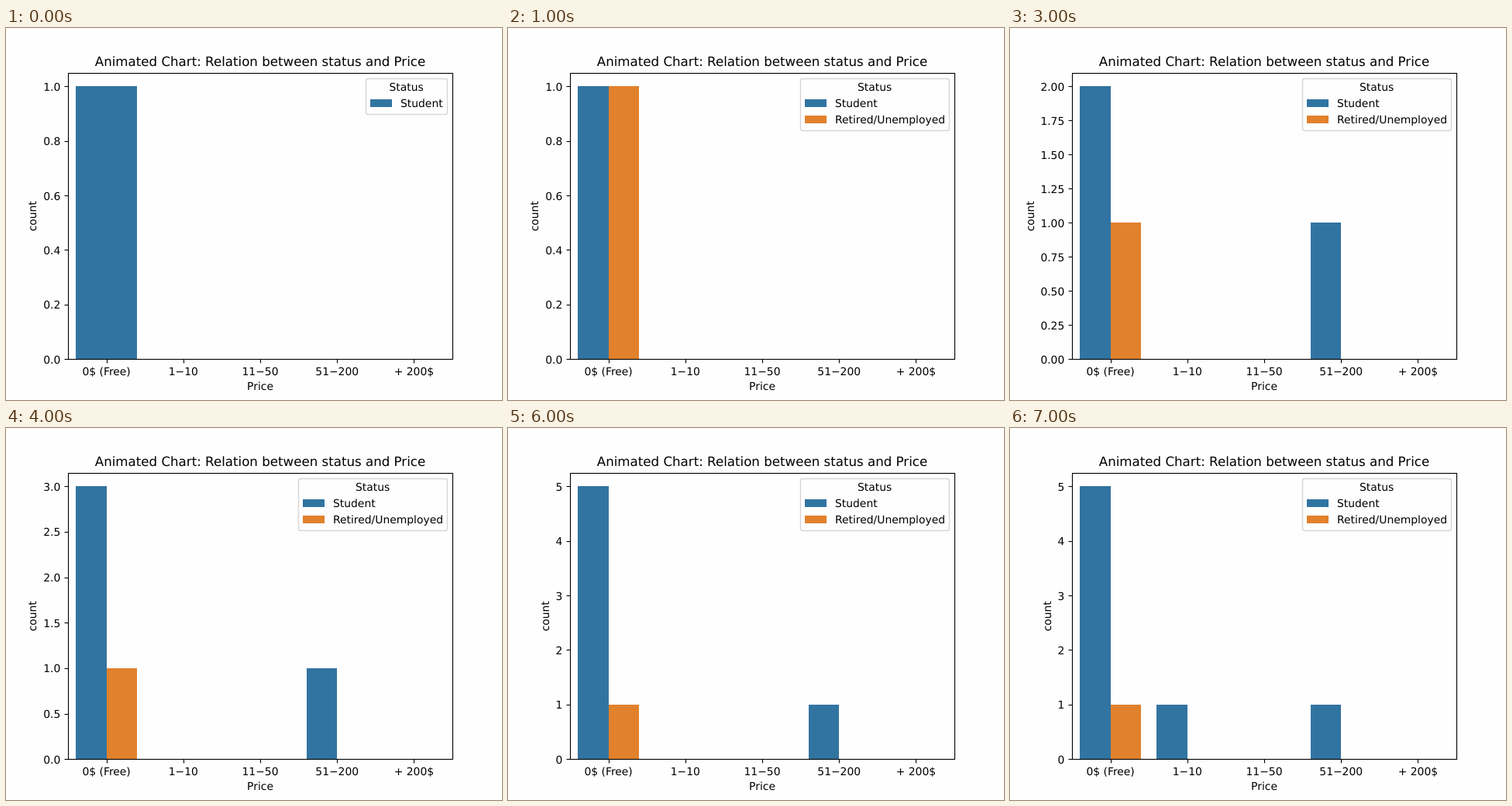
These frames come from a looping animation (640x480 px, 8000 ms). An HTML page with a canvas:

```html
<!DOCTYPE html>
<html lang="en">
<head>
<meta charset="utf-8">
<title>Animated bar chart</title>
<style>
  html, body { margin: 0; width: 100%; height: 100%; overflow: hidden; background: #fefefe; }
  canvas { display: block; }
</style>
</head>
<body>
<canvas id="chart" width="640" height="480"></canvas>
<script>
const ctx = document.getElementById('chart').getContext('2d');

const AXES = { left: 80, right: 576, top: 57.6, bottom: 427.2 };
const BAND = (AXES.right - AXES.left) / 5;
const PLOT_HEIGHT = (AXES.bottom - AXES.top) / 1.05;
const FONT = 100 / 72 * 10;
const LINE = 100 / 72 * 0.8;
const COLORS = ['#3274a1', '#e1812c'];
const STATUSES = ['Student', 'Retired/Unemployed'];
const PRICES = ['0$ (Free)', '1−10', '11−50', '51−200', '+ 200$'];
const STEP_MS = 1000;

// Each bar is [price index, status index, count].
const FREE_RETIRED = [0, 1, 1], MID = [3, 0, 1], LOW = [1, 0, 1];
const STEPS = [
  { max: 1, tick: 0.2, digits: 1, bars: [], statuses: 1 },
  { max: 1, tick: 0.2, digits: 1, bars: [FREE_RETIRED] },
  { max: 2, tick: 0.25, digits: 2, bars: [FREE_RETIRED] },
  { max: 2, tick: 0.25, digits: 2, bars: [FREE_RETIRED, MID] },
  { max: 3, tick: 0.5, digits: 1, bars: [FREE_RETIRED, MID] },
  { max: 4, tick: 0.5, digits: 1, bars: [FREE_RETIRED, MID] },
  { max: 5, tick: 1, digits: 0, bars: [FREE_RETIRED, MID] },
  { max: 5, tick: 1, digits: 0, bars: [FREE_RETIRED, MID, LOW] }
];

const bandCenter = i => AXES.left + BAND * (i + 0.5);
const crisp = v => Math.round(v) + 0.5;

function text(str, x, y, align = 'center', size = FONT) {
  ctx.font = `${size}px "DejaVu Sans", sans-serif`;
  ctx.textAlign = align;
  ctx.fillStyle = '#000';
  ctx.fillText(str, x, y);
}

function line(x1, y1, x2, y2) {
  ctx.beginPath();
  ctx.moveTo(x1, y1);
  ctx.lineTo(x2, y2);
  ctx.stroke();
}

function box(x1, y1, x2, y2, color) {
  const [l, t, r, b] = [x1, y1, x2, y2].map(Math.round);
  ctx.fillStyle = color;
  ctx.fillRect(l, t, r - l, b - t);
}

function drawBars({ max, bars, statuses = 2 }) {
  const width = BAND * 0.8 / statuses;
  for (const [price, status, count] of [[0, 0, max], ...bars]) {
    const x = bandCenter(price) - BAND * 0.4 + status * width;
    box(x, AXES.bottom - count / max * PLOT_HEIGHT, x + width, AXES.bottom, COLORS[status]);
  }
}

function drawAxes({ max, tick, digits }) {
  const left = crisp(AXES.left), bottom = crisp(AXES.bottom);
  ctx.strokeStyle = '#000';
  ctx.lineWidth = LINE;
  PRICES.forEach((label, i) => {
    const x = crisp(bandCenter(i));
    line(x, bottom, x, bottom + 5);
    text(label, bandCenter(i), 448);
  });
  for (let i = 0; i * tick < max + tick / 2; i++) {
    const y = AXES.bottom - i * tick / max * PLOT_HEIGHT;
    line(left - 5, crisp(y), left, crisp(y));
    text((i * tick).toFixed(digits), 70.28, Math.round(y + 5.5), 'right');
  }
  const top = crisp(AXES.top), right = crisp(AXES.right);
  ctx.strokeRect(left, top, right - left, bottom - top);

  text('Price', 328, 467);
  const labelWidth = ctx.measureText(max.toFixed(digits)).width;
  ctx.save();
  ctx.translate(61.5 - labelWidth, 242.8);
  ctx.rotate(-Math.PI / 2);
  text('count', 0, 0);
  ctx.restore();
  text('Animated Chart: Relation between status and Price', 328, 49, 'center', FONT * 1.2);
}

function drawLegend({ statuses = 2 }) {
  const left = statuses === 1 ? 464.5 : 377.5;
  const right = 569.5, top = 65.5;
  ctx.beginPath();
  ctx.roundRect(left, top, right - left, 25 + 21 * statuses, 2.8);
  ctx.fillStyle = '#fefefe';
  ctx.fill();
  ctx.strokeStyle = '#d6d6d6';
  ctx.lineWidth = FONT / 10;
  ctx.stroke();

  text('Status', (left + right) / 2 - 0.4, 81);
  for (let i = 0; i < statuses; i++) {
    const base = 102 + 21 * i;
    const swatch = Math.floor(left + 5.6);
    box(swatch, base - 10, swatch + 28, base, COLORS[i]);
    text(STATUSES[i], left + 44.5, base, 'left');
  }
}

function draw(now) {
  const step = STEPS[Math.floor(now / STEP_MS) % STEPS.length];
  ctx.fillStyle = '#fefefe';
  ctx.fillRect(0, 0, 640, 480);
  drawBars(step);
  drawAxes(step);
  drawLegend(step);
}

ctx.textRendering = 'geometricPrecision';
const start = performance.now();
function loop() {
  draw(performance.now() - start);
  requestAnimationFrame(loop);
}
loop();
</script>
</body>
</html>
```
